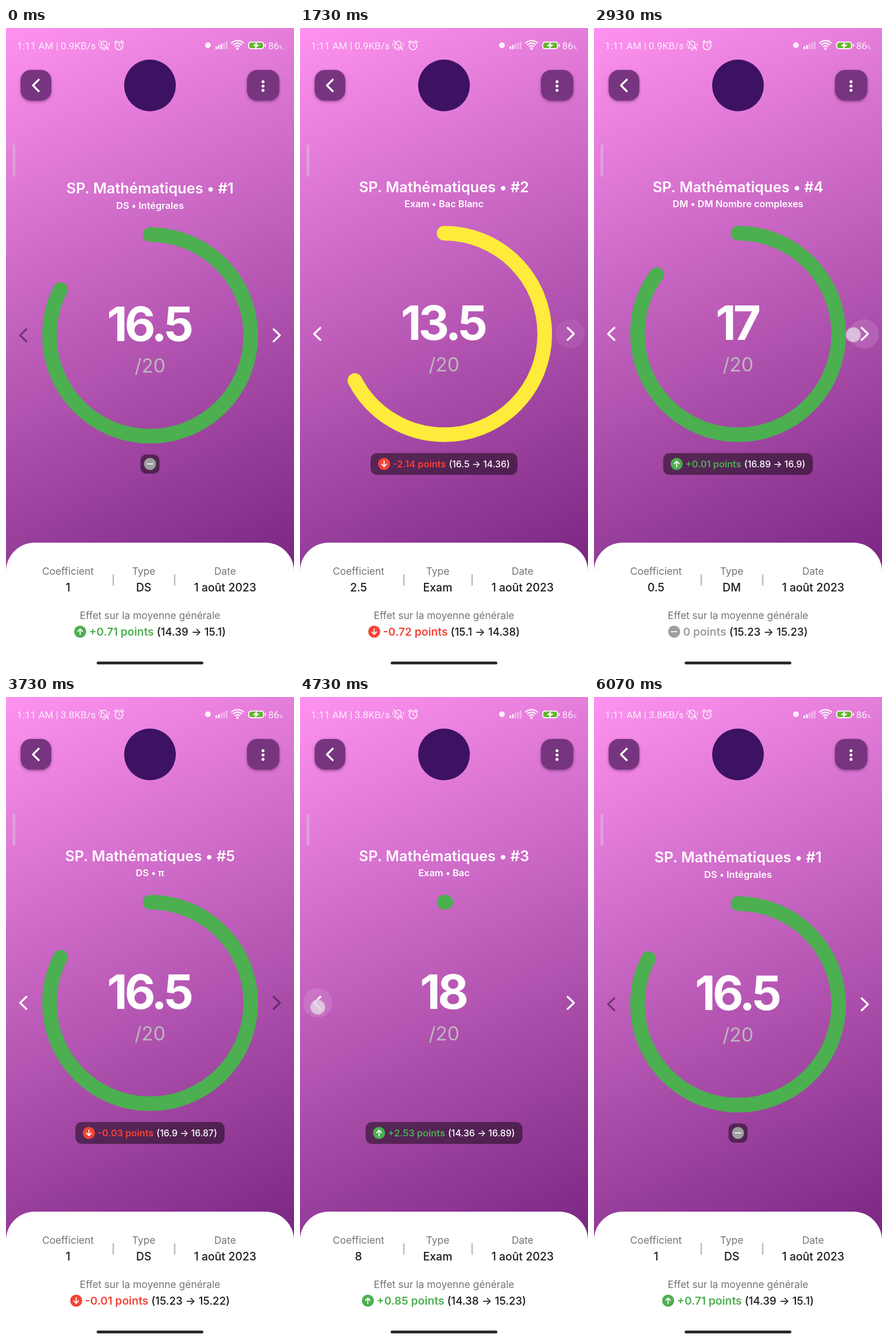
An HTML page with a canvas that plays this animation: 502x1116 px, repeating every 6.87 s.

```html
<!DOCTYPE html>
<html lang="fr">
<head>
<meta charset="utf-8">
<title>Notes</title>
<style>
html, body { margin: 0; width: 100%; height: 100%; overflow: hidden; background: #b455b1; }
canvas { display: block; width: 502px; height: 1116px; }
</style>
</head>
<body>
<canvas id="stage"></canvas>
<script>
const W = 502, H = 1116, LOOP = 6870, STEP = 200 / 3, ARC_MS = 300;
const GREEN = '#4caf50', YELLOW = '#ffeb3b', RED = '#f44336', GREY = '#9e9e9e';
const canvas = document.getElementById('stage');
const ctx = canvas.getContext('2d');
const ratio = window.devicePixelRatio || 1;
canvas.width = W * ratio;
canvas.height = H * ratio;
ctx.scale(ratio, ratio);

// subject and overall: [direction, amount, range]
const pages = [
  { grade: 16.5, kind: 'DS', name: 'Intégrales', coef: '1',
    subject: [0], overall: [1, '+0.71', '14.39 → 15.1'] },
  { grade: 13.5, kind: 'Exam', name: 'Bac Blanc', coef: '2.5',
    subject: [-1, '-2.14', '16.5 → 14.36'], overall: [-1, '-0.72', '15.1 → 14.38'] },
  { grade: 18, kind: 'Exam', name: 'Bac', coef: '8',
    subject: [1, '+2.53', '14.36 → 16.89'], overall: [1, '+0.85', '14.38 → 15.23'] },
  { grade: 17, kind: 'DM', name: 'DM Nombre complexes', coef: '0.5',
    subject: [1, '+0.01', '16.89 → 16.9'], overall: [0, '0', '15.23 → 15.23'] },
  { grade: 16.5, kind: 'DS', name: 'π', coef: '1',
    subject: [-1, '-0.03', '16.9 → 16.87'], overall: [-1, '-0.01', '15.23 → 15.22'] }
];

// [start time, page index]
const visits = [[-1000, 0], [1434, 1], [1960, 2], [2470, 3], [2980, 4],
  [4310, 3], [4732.4, 2], [5207, 1], [5610, 0]];

// [down, up, x, y]
const touches = [[1395, 1475, 470, 538], [1860, 2000, 462, 537], [2370, 2500, 457, 535],
  [2840, 3060, 452, 534], [3440, 3650, 440, 542], [4265, 4400, 30, 541],
  [4590, 4760, 31, 540], [5060, 5260, 31, 538], [5400, 5840, 32, 537]];

const clamp = v => Math.max(0, Math.min(1, v));

function setFont(size, weight, family = 'Inter', spacing = 0) {
  ctx.font = `${weight} ${size}px ${family}, sans-serif`;
  ctx.letterSpacing = spacing + 'px';
}

function text(str, x, y, size, weight, color, { align = 'center', family, spacing } = {}) {
  setFont(size, weight, family, spacing);
  ctx.textAlign = align;
  ctx.fillStyle = color;
  ctx.fillText(str, x, y);
}

function box(x, y, w, h, r, color) {
  ctx.fillStyle = color;
  ctx.beginPath();
  ctx.roundRect(x, y, w, h, r);
  ctx.fill();
}

function disc(x, y, r, color) {
  ctx.fillStyle = color;
  ctx.beginPath();
  ctx.arc(x, y, r, 0, Math.PI * 2);
  ctx.fill();
}

function stroke(color, width, trace, cap = 'round') {
  ctx.strokeStyle = color;
  ctx.lineWidth = width;
  ctx.lineCap = cap;
  ctx.lineJoin = 'round';
  ctx.beginPath();
  trace();
  ctx.stroke();
}

function line(color, width, ...points) {
  stroke(color, width, () => points.forEach(([x, y]) => ctx.lineTo(x, y)));
}

function chevron(x, y, dir, w, h, color) {
  stroke(color, 3.2, () => {
    ctx.moveTo(x - dir * w, y - h);
    ctx.lineTo(x + dir * w, y);
    ctx.lineTo(x - dir * w, y + h);
  }, 'butt');
}

function background() {
  const g = ctx.createLinearGradient(0, 0, W, H);
  g.addColorStop(0, '#ff92f0');
  g.addColorStop(1, '#661672');
  ctx.fillStyle = g;
  ctx.fillRect(0, 0, W, H);
}

function statusBar(t) {
  const white = '#fbeefa';
  const family = 'Roboto';
  text(`1:11 AM | ${t < 3190 ? '0.9' : '3.8'}KB/s`, 19, 37, 17.2, 400, white, { align: 'left', family });

  // muted bell
  stroke(white, 1.5, () => {
    ctx.moveTo(164, 35);
    ctx.lineTo(166, 32);
    ctx.lineTo(166, 28);
    ctx.quadraticCurveTo(166, 23, 171, 23);
    ctx.quadraticCurveTo(176, 23, 176, 28);
    ctx.lineTo(176, 32);
    ctx.lineTo(178, 35);
    ctx.closePath();
    ctx.moveTo(169, 38);
    ctx.lineTo(173, 38);
    ctx.moveTo(163, 22);
    ctx.lineTo(179, 38);
  });
  line(white, 1.3, [162, 26], [162, 31]);
  line(white, 1.3, [180, 26], [180, 31]);

  // alarm clock
  stroke(white, 1.7, () => ctx.arc(197, 31, 6.8, 0, Math.PI * 2));
  line(white, 1.5, [197, 27], [197, 31], [200, 33]);
  line(white, 1.8, [189, 25], [193, 22]);
  line(white, 1.8, [205, 25], [201, 22]);

  disc(352, 30, 5, white);

  const level = t < 1200 ? 3 : 2;
  for (let i = 0; i < 5; i++) {
    const h = 5 + i * 2.2;
    box(365 + i * 4.5, 37 - h, 3.2, h, 1, i < level ? white : 'rgba(255,255,255,.4)');
  }

  for (const r of [6, 10.5, 15])
    stroke(white, 2.3, () => ctx.arc(403.5, 37, r, -Math.PI * .76, -Math.PI * .24), 'butt');
  disc(403.5, 36, 2.2, white);

  box(422, 23.5, 28, 13.5, 5, white);
  box(424, 25.5, 24, 9.5, 3.5, '#62b52c');
  box(451, 27.5, 2, 5.5, 1, white);
  ctx.fillStyle = '#fff';
  ctx.beginPath();
  [[438, 24], [430, 31.5], [435, 31.5], [433, 37], [442, 29], [437, 29]].forEach(p => ctx.lineTo(...p));
  ctx.fill();

  text('86', 457, 37, 17, 400, white, { align: 'left', family });
  text('%', 476, 37, 9, 400, white, { align: 'left', family });
}

function header() {
  ctx.save();
  ctx.shadowColor = 'rgba(40,0,50,.4)';
  ctx.shadowBlur = 5;
  ctx.shadowOffsetY = 2;
  box(25.5, 73, 53.5, 53.5, 18, '#78357f');
  box(420, 73, 56.5, 53.5, 18, '#78357f');
  ctx.restore();
  chevron(52.5, 100, -1, 5.5, 11, '#fff');
  for (const y of [93.5, 101, 108.5]) disc(448, y, 2.6, '#fff');
  disc(251, 100, 45, '#3d1263');
  box(11.5, 203, 4.5, 56, 2, 'rgba(222,178,222,.7)');
}

const toneOf = dir => dir > 0 ? GREEN : dir < 0 ? RED : GREY;

function changeIcon(x, y, dir) {
  disc(x, y, 10.5, toneOf(dir));
  if (!dir) return line('#eee', 1.8, [x - 5, y], [x + 5, y]);
  line('#fff', 1.8, [x, y + 5 * dir], [x, y - 4.5 * dir]);
  line('#fff', 1.8, [x - 4, y - .5 * dir], [x, y - 4.5 * dir], [x + 4, y - .5 * dir]);
}

function changeRow([dir, amount, range], y, size, color, pill) {
  const label = `${amount} points`, detail = `(${range})`, gap = 5, icon = 21;
  setFont(size, 600);
  const labelW = ctx.measureText(label).width;
  setFont(size - .5, 500);
  const detailW = ctx.measureText(detail).width;
  const total = icon + labelW + detailW + gap * 2;
  const x = 251 - total / 2;
  if (pill) box(x - 13, y - 19, total + 26, 38, 11, 'rgba(0,0,0,.47)');
  changeIcon(x + icon / 2, y, dir);
  const base = y + size * .36;
  text(label, x + icon + gap, base, size, 600, toneOf(dir), { align: 'left' });
  text(detail, x + total - detailW, base, size - .5, 500, color, { align: 'left' });
}

function arrow(dir, y, enabled) {
  chevron(251 + dir * 220.5, y, dir, 6, 11.5, enabled ? '#fff' : 'rgba(60,25,65,.6)');
}

function gradePanel(index, age) {
  const page = pages[index];
  const dy = index ? 0 : 2.5;
  text(`SP. Mathématiques • #${index + 1}`, 251, 285.5 + dy, 25.5, 600, '#fff');
  text(`${page.kind} • ${page.name}`, 251, 312 + dy, 16.4, 600, '#fff');

  const share = page.grade / 20 * clamp(age / ARC_MS);
  const top = -Math.PI / 2;
  stroke(page.grade < 15 ? YELLOW : GREEN, 25.5,
    () => ctx.arc(251.2, 532.7 + dy, 175.4, top, top + Math.PI * 2 * share));

  text(String(page.grade), 249, 542.5 + dy, 83, 700, '#fff', { spacing: -5 });
  text('/20', 251, 597.5 + dy, 33.5, 400, '#bdb6bd');
  arrow(-1, 532.5 + dy, index > 0);
  arrow(1, 532.5 + dy, index < pages.length - 1);

  if (page.subject[0]) {
    changeRow(page.subject, 759, 16.4, '#fff', true);
  } else {
    box(234.5, 742.5, 33, 33.5, 10, 'rgba(0,0,0,.47)');
    changeIcon(251, 759, 0);
  }
}

function card(page) {
  box(0, 896, W, H - 896, [50, 50, 0, 0], '#fff');
  const spread = page.kind === 'Exam' ? 6 : 0;
  const columns = [
    [108 - spread, 'Coefficient', page.coef],
    [240, 'Type', page.kind],
    [382 + spread, 'Date', '1 août 2023']
  ];
  for (const [x, label, value] of columns) {
    text(label, x, 952, 17.4, 400, '#757575');
    text(value, x, 981, 19.5, 500, '#1c1c1c');
  }
  for (const x of [187 - spread, 294 + spread]) box(x - 1.3, 951, 2.6, 20, 1, '#bdbdbd');
  text('Effet sur la moyenne générale', 251, 1029, 17.4, 400, '#757575');
  changeRow(page.overall, 1051, 19.3, '#1c1c1c', false);
  box(158, 1103, 186, 5, 2.5, '#2b2b2b');
}

function ripple(t, index) {
  const enabled = right => right ? index < 4 || t < 3400 : index > 0;
  const touch = touches.findLast(([down]) => down <= t);
  if (!touch) return;
  const [down, up, x] = touch;
  const right = x > 251;
  if (!enabled(right)) return;
  const shown = clamp((t - down + 40) / 130) * clamp((up + 450 - t) / 350);
  disc(right ? 471 : 31, index ? 532.5 : 535, 25.5, `rgba(255,255,255,${.12 * shown})`);
}

function finger(t) {
  for (const [down, up, x, y] of touches) {
    if (t < down || t > up + 80) continue;
    const shown = clamp((up + 80 - t) / 80);
    disc(x, y, 14, `rgba(190,160,190,${.5 * shown})`);
    disc(x, y, 12.5, `rgba(240,225,240,${.65 * shown})`);
  }
}

function draw(now) {
  const t = Math.floor((now % LOOP + 5) / STEP) * STEP;
  const [start, index] = visits.findLast(v => v[0] <= t);
  background();
  statusBar(t);
  header();
  ripple(t, index);
  gradePanel(index, t - start);
  card(pages[index]);
  finger(t);
}

const begin = performance.now();
function tick() {
  draw(performance.now() - begin);
  requestAnimationFrame(tick);
}
tick();
</script>
</body>
</html>
```
